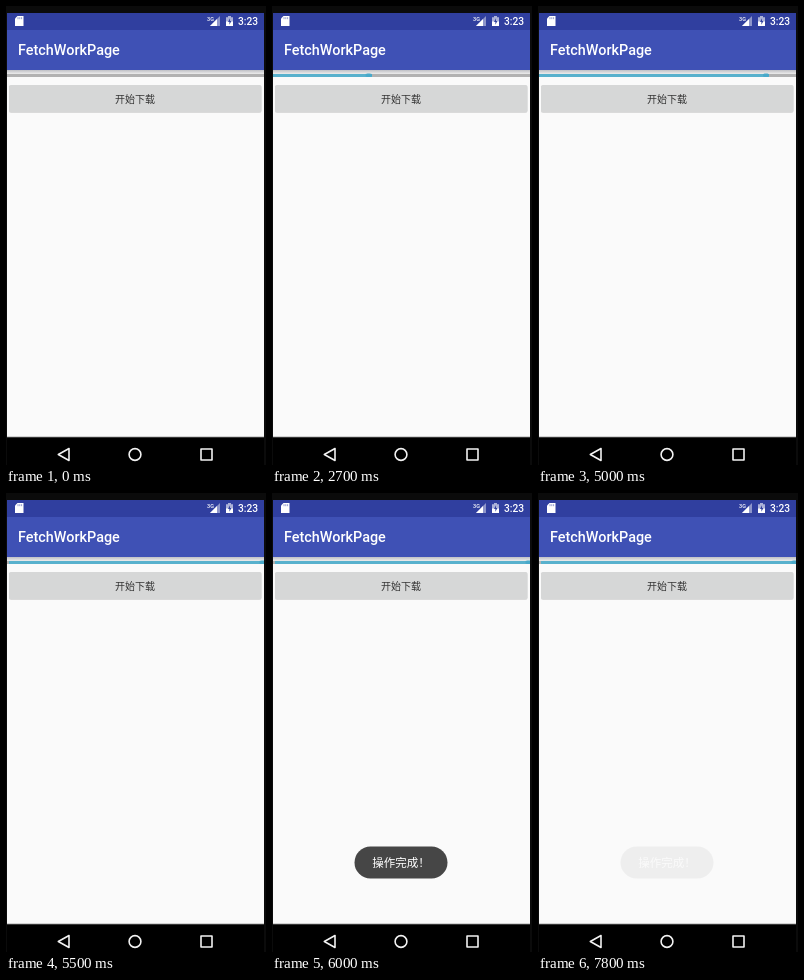
Write an HTML page that moves like this. It is 260 px wide and 459 px high and loops after 8000 ms.

```html
<!DOCTYPE html>
<html lang="zh-CN">
<head>
<meta charset="utf-8">
<title>Download progress</title>
<style>
  html, body { margin: 0; width: 100%; height: 100%; overflow: hidden; background: #000; }
  svg { display: block; width: 260px; height: 459px; }
  text { fill: #fff; }
  .latin { font-family: Roboto, sans-serif; font-weight: 500; }
  .cjk { font-family: "Noto Sans CJK SC", "Noto Sans CJK", sans-serif; }
  .fill { animation: fill 8s infinite step-end; }
  .press { opacity: 0; animation: press 8s infinite step-end; }
  .toast { opacity: 0; animation: toast 8s infinite step-end; }

  /* 45 equal jumps between 1.0 s and 5.5 s */
  @keyframes fill {
    0% { transform: translateX(-264px); }
    12.5% { transform: translateX(-255.5px); animation-timing-function: steps(45, end); }
    68.75%, 100% { transform: translateX(1.5px); }
  }
  @keyframes press {
    0% { opacity: 0; }
    11.25% { opacity: .5; }
    12.5% { opacity: .8; }
    13.75% { opacity: .4; }
    15% { opacity: .2; }
    16.25%, 100% { opacity: 0; }
  }
  @keyframes toast {
    0% { opacity: 0; }
    71.25% { opacity: .3; }
    72.5% { opacity: .63; }
    73.75% { opacity: .88; }
    75% { opacity: 1; }
    93.75% { opacity: .78; }
    95% { opacity: .53; }
    96.25% { opacity: .28; }
    97.5%, 100% { opacity: .06; }
  }
</style>
</head>
<body>
<svg viewBox="0 0 260 459">
  <defs>
    <linearGradient id="shade" x2="0" y2="1">
      <stop stop-color="#bfc0c6"/>
      <stop offset="1" stop-color="#ececec"/>
    </linearGradient>
    <clipPath id="track"><rect x="1" y="67" width="257" height="5"/></clipPath>
  </defs>

  <rect width="260" height="459" fill="#0b0b0b"/>
  <rect x="1" y="7" width="257" height="17" fill="#303f9f"/>
  <rect x="1" y="24" width="257" height="40" fill="#3f51b5"/>
  <rect x="1" y="64" width="257" height="367" fill="#fafafa"/>
  <rect x="1" y="64" width="257" height="4" fill="url(#shade)"/>
  <rect x="1" y="430" width="257" height="1.5" fill="#d2d2d2"/>
  <rect x="1" y="431.5" width="257" height="27.5" fill="#000"/>

  <!-- status bar -->
  <path d="M11.5 10H17.5V20H9V12.5Z" fill="#fff"/>
  <path d="M12 11.2v2M13.8 11.2v2M15.6 11.2v2" stroke="#7d86c4" stroke-width=".8"/>
  <text class="latin" x="201" y="15" font-size="5.5">3G</text>
  <path d="M214 10V20H204Z" fill="#fff" opacity=".45"/>
  <path d="M211 13V20H204Z" fill="#fff"/>
  <path d="M222 10h3v1.2h2V20h-7v-8.8h2Z" fill="#fff" opacity=".6"/>
  <path d="M220 15.5h7V20h-7Z" fill="#fff"/>
  <path d="M224 12.3l-2 3.8h1.4v2.6l2-3.8h-1.4Z" fill="#303f9f"/>
  <text class="latin" x="232" y="19" font-size="10.2">3:23</text>

  <text class="latin" x="12" y="49" font-size="14.4">FetchWorkPage</text>

  <!-- progress bar -->
  <g clip-path="url(#track)">
    <rect x="1" y="68" width="257" height="3" fill="#b2b2b2"/>
    <g class="fill">
      <rect x="1" y="68" width="257" height="3" fill="#58b1cd"/>
      <rect x="252" y="67.5" width="6" height="3.6" rx="1.5" fill="#48a9ca"/>
    </g>
  </g>

  <!-- button -->
  <rect x="3" y="80" width="252.5" height="27" rx="2" fill="#000" opacity=".13"/>
  <rect x="3" y="79" width="252.5" height="27" rx="1.6" fill="#d6d7d7"/>
  <rect class="press" x="3" y="79" width="252.5" height="27" rx="1.6" fill="#bcbdbd"/>
  <text class="cjk" x="129" y="96.5" font-size="10" text-anchor="middle" style="fill:#333">开始下载</text>

  <!-- navigation bar -->
  <g fill="none" stroke="#f2f2f2" stroke-width="1.6" stroke-linejoin="round">
    <path d="M52.3 448.5L63 442.5V454.5Z"/>
    <circle cx="129" cy="448.5" r="5.9"/>
    <rect x="195" y="443" width="11" height="11"/>
  </g>

  <g class="toast">
    <rect x="82.5" y="353.5" width="93" height="32" rx="16" fill="#464646"/>
    <text class="cjk" x="100.3" y="374" font-size="11.5">操作完成！</text>
  </g>
</svg>
</body>
</html>
```
